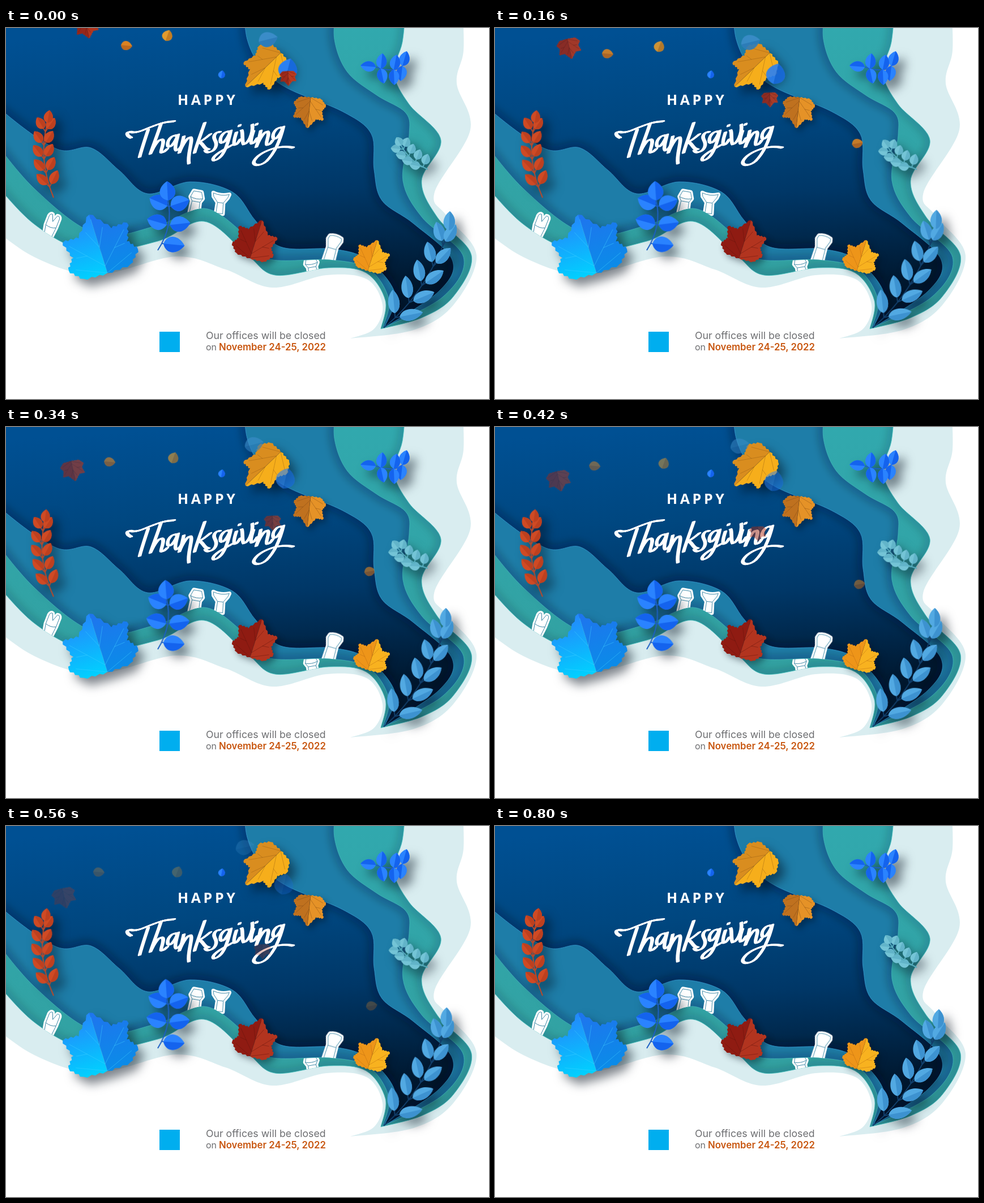
Recreate the animation shown at these times as an HTML page. Size 853 px wide and 656 px high, loop 830 ms.

```html
<!DOCTYPE html>
<html lang="en">
<head>
<meta charset="utf-8">
<title>Happy Thanksgiving</title>
<style>
html, body { margin: 0; width: 100%; height: 100%; overflow: hidden; background: #fff; }
svg { display: block; width: 853px; height: 656px; }
.fall { animation: drift 830ms linear infinite, fade 830ms linear infinite; }
.sway { animation: sway 830ms infinite; }
.lift { filter: drop-shadow(11px 12px 9px rgba(0, 12, 25, .5)); }
.soft { filter: drop-shadow(5px 6px 6px rgba(0, 12, 25, .4)); }
@keyframes drift {
  96.4%, 100% { transform: translate(var(--dx), var(--dy)); }
}
@keyframes fade {
  0%, 12% { opacity: 1; }
  92%, 100% { opacity: 0; }
}
@keyframes sway {
  0% { transform: rotate(0deg); animation-timing-function: cubic-bezier(.61, 1, .88, 1); }
  48.2% { transform: rotate(var(--a)); animation-timing-function: cubic-bezier(.12, 0, .39, 0); }
  96.4%, 100% { transform: rotate(0deg); }
}
.happy { font: 700 25px "Open Sans", "Noto Sans", sans-serif; letter-spacing: 4.6px; fill: #fff; }
.note { font: 400 17.7px Inter, sans-serif; fill: #6d6e71; }
.date { font: 600 16.75px Inter, sans-serif; fill: #c8560f; }
</style>
</head>
<body>
<svg id="stage" viewBox="0 0 853 656" xmlns="http://www.w3.org/2000/svg"></svg>
<script>
// Smooth curve through "x y, x y" key points
function curve(text) {
  const p = text.split(', ').map(s => s.split(' ').map(Number));
  return p.slice(1).reduce((d, c, i) => {
    const b = p[i], a = p[i - 1] || b, e = p[i + 2] || c;
    const near = b.map((v, k) => v + (c[k] - a[k]) / 6);
    const far = c.map((v, k) => v - (e[k] - b[k]) / 6);
    return `${d}C${near} ${far} ${c}`;
  }, p[0].join(' '));
}

// Paper layers, widest first: right edge down to the tip, lower edge back to the left
const layers = [
  { id: 'pale', fill: '#d9edf0',
    right: '806 -40, 808 40, 796 98, 820 180, 757 290, 778 332, 831 402, 790 490, 720 534, 608 549',
    low: '608 549, 650 532, 665 490, 637 444, 566 437, 470 459, 388 427, 300 404, 160 436, 50 405, -40 340' },
  { id: 'teal', fill: 'url(#tealFill)', shade: .14, edge: '#45c3bf',
    right: '706 -40, 700 25, 685 80, 712 135, 768 198, 734 270, 762 335, 822 402, 790 475, 735 512, 662 532',
    low: '662 532, 670 482, 636 433, 570 424, 475 437, 425 400, 350 342, 268 377, 150 395, 50 347, -40 250' },
  { id: 'blue', fill: '#1e7da8', shade: .22, edge: '#43b9bd',
    right: '584 -40, 580 20, 603 78, 655 119, 706 150, 712 190, 701 270, 735 335, 808 405, 772 475, 665 531',
    low: '665 531, 676 480, 642 427, 575 410, 462 408, 418 362, 350 319, 265 350, 160 364, 50 284, -40 175' },
  { id: 'navy', fill: 'url(#navyFill)', shade: .26, edge: '#3a9fd6',
    right: '420 -40, 426 20, 450 68, 496 106, 595 148, 645 187, 650 250, 664 305, 720 346, 788 410, 765 465, 668 530',
    low: '668 530, 687 470, 640 411, 580 391, 485 387, 440 340, 400 290, 325 272, 250 293, 200 252, 150 212, 90 214, 0 152, -40 105' }
];

const clip = (id, art) => `<g clip-path="url(#${id})">${art}</g>`;

function layer({ id, fill, right, low, shade, edge }) {
  const d = `M-40 -40L${curve(right)}L${curve(low)}Z`;
  const rim = shade ? clip(id, `<path d="${d}" fill="none" stroke="#001526" stroke-opacity="${shade}" stroke-width="18" filter="url(#blur)"/>`) +
    `<path d="${d}" fill="none" stroke="${edge}" stroke-opacity=".75"/>` : '';
  return `<clipPath id="${id}"><path d="${d}"/></clipPath><path d="${d}" fill="${fill}"/>${rim}`;
}

// Simple leaf growing from its base, angle clockwise from up; lift slides it along its axis
const leaf = (x, y, angle, len, w, [c1, c2], lift = 0) =>
  `<g transform="translate(${x} ${y}) rotate(${angle}) scale(${w} ${len}) translate(0 ${lift})">
    <path d="M0 0C.7 -.15 .65 -.7 0 -1C-.65 -.7 -.7 -.15 0 0" fill="${c1}"/>
    <path d="M0 0C.7 -.15 .65 -.7 0 -1Z" fill="${c2}"/></g>`;
const petal = (x, y, angle, len, w, tones) => leaf(x, y, angle, len, w, tones, .5);

// Half a maple leaf: key corners joined by toothed edges
const corners = [[0, 0], [38, -2], [57, -22], [44, -40], [53, -69], [27, -68], [0, -100]];
const half = corners.slice(1).reduce((d, [x, y], i) => {
  const [px, py] = corners[i], dx = x - px, dy = y - py, size = 2.6 / Math.hypot(dx, dy);
  for (let j = 1; j <= 3; j++) {
    const f = (j - .4) / 3;
    d += `L${px + dx * f - dy * size} ${py + dy * f + dx * size}L${px + dx * j / 3} ${py + dy * j / 3}`;
  }
  return d;
}, 'M0 0') + 'Z';
const veins = 'M0 0V-92' + [-1, 1].map(s =>
  `M0 0L${46 * s} -20M0 -12L${45 * s} -60M0 -44L${14 * s} -74M${22 * s} -36L${40 * s} -38`).join('');

// Maple leaf from its stalk (x, y) to its main tip (tx, ty)
function maple(x, y, tx, ty, wide, left, right, vein) {
  const k = Math.hypot(tx - x, ty - y) / 100;
  const angle = Math.atan2(tx - x, y - ty) * 180 / Math.PI;
  return `<g transform="translate(${x} ${y}) rotate(${angle}) scale(${k * wide} ${k})">
    <path d="${half}" fill="${left}" transform="scale(-1 1)"/><path d="${half}" fill="${right}"/>
    <path d="${veins}" fill="none" stroke="${vein}" stroke-width="${.7 / k}" stroke-opacity=".6"/></g>`;
}

// Leaves in even pairs along a quadratic stem; sizes and angles run from base to end
function branch({ stem, pairs, len, w, left, right, end, gap, tones, line, bare = 0 }) {
  const [x0, y0, x1, y1, x2, y2] = stem;
  const at = (a, b, c, t) => (1 - t) ** 2 * a + 2 * t * (1 - t) * b + t * t * c;
  const mix = ([a, b], t) => a + (b - a) * t;
  const stroke = `fill="none" stroke="${line}" stroke-width="2"`;
  let art = `<path d="M${x0} ${y0}Q${x1} ${y1} ${x2} ${y2}" ${stroke}/>`;
  for (let i = 0; i < pairs; i++) {
    const t = .14 + .74 * i / (pairs - 1), size = mix(len, t);
    const x = at(x0, x1, x2, t), y = at(y0, y1, y2, t);
    for (const angle of i < bare ? [mix(right, t)] : [mix(left, t), mix(right, t)])
      art += `<path d="M0 0V${-gap}" transform="translate(${x} ${y}) rotate(${angle})" ${stroke}/>` +
        leaf(x, y, angle, size, w, tones, -gap / size);
  }
  return art + leaf(x2, y2, end, len[1], w, tones);
}

const sway = (x, y, a, art) =>
  `<g class="lift"><g class="sway" style="--a:${a}deg;transform-origin:${x}px ${y}px">${art}</g></g>`;
const fall = (dx, dy, art) => `<g class="fall" style="--dx:${dx}px;--dy:${dy}px">${art}</g>`;

// Dental parts
const parts = {
  fork: 'M-9 -13Q-8 -18 -4 -17L0 -5L5 -17Q9 -18 10 -13L9 4L6 24H-7L-10 4ZM-10 4Q0 8 9 4',
  cap: 'M-7 -15H7L11 -4L7 3L8 22H-8L-7 3L-11 -4ZM-11 -4Q0 0 11 -4M-7 3H7',
  cup: 'M-14 -13Q0 -8 14 -13L12 -7L5 3L6 22H-6L-5 3L-13 -7ZM-5 3H5',
  post: 'M-10 -18Q0 -22 11 -18L12 -13L7 0L8 26H-9L-8 2L-12 -12ZM-8 3H7'
};
const part = (name, x, y, r) => `<g transform="translate(${x} ${y}) rotate(${r})" stroke-linejoin="round">
  <path d="${parts[name]}" fill="#fff" stroke="#fff" stroke-width="7.5"/>
  <path d="${parts[name]}" fill="#fff" stroke="#3a87a5" stroke-width=".9"/></g>`;

// Brush lettering: [advance, strokes] per letter on a rising baseline; capitals are swash forms
const arch = 'M6 -26C4 -15 1 -5 -2 3C4 -12 13 -26 18 -24';
const bowl = 'M19 -28C10 -34 -1 -19 2 -11C6 -5 15 -18 20 -31';
const glyphs = {
  t: [20, 'M-15 -29C-25 -34 -24 -41 -14 -39C2 -35 26 -57 61 -58M15 -43C10 -28 4 -10 0 5'],
  h: [28, 'M18 -53C12 -34 4 -14 -1 1C6 -15 14 -26 20 -24C25 -21 17 -6 18 -2C21 0 25 -4 29 -8'],
  a: [24, bowl + 'C16 -15 13 -5 17 -3C21 -3 25 -9 28 -14'],
  n: [26, arch + 'C23 -20 13 -4 17 -1C20 0 24 -4 27 -9'],
  N: [27, arch + 'C23 -20 12 5 15 22'],
  k: [21, 'M16 -48C10 -30 2 -10 -2 5M26 -28C19 -22 11 -16 6 -14C14 -12 14 -1 23 -1'],
  s: [21, 'M22 -30C14 -31 9 -23 13 -16C18 -8 14 2 5 5C0 7 -4 4 -4 2'],
  g: [26, bowl + 'C16 -12 11 4 3 14C-4 22 -13 24 -11 18C-8 10 11 1 25 -7'],
  G: [0, bowl + 'C15 -10 6 14 -10 30C-22 40 -35 38 -32 30C-25 16 7 0 37 6'],
  i: [11, 'M4 -26C1 -17 -2 -6 1 -4C4 -3 8 -9 11 -14M9 -37L10 -39'],
  v: [19, 'M2 -29C5 -27 2 -6 6 -4C14 -6 23 -23 21 -39']
};
let pen = 236;
const word = [...'thaNksgiviNG'.replace('viN', 'vin')].map(c => {
  const [advance, d] = glyphs[c], x = pen;
  pen += advance;
  return `<path d="${d}" transform="translate(${x} ${222 - (x - 250) * .075})"/>`;
}).join('');
// A thin stroke repeated sideways acts as a flat nib
const nib = [-2, -1, 0, 1, 2].map(i => `<g transform="translate(${i * 1.05} ${-i * .35})">${word}</g>`).join('');

const [pale, teal, blue, navy] = layers.map(layer);
const amber = ['#d98222', '#bd691d'], royal = ['#2a83ff', '#1463ee'];

const redBranch = branch({ stem: [84, 300, 56, 232, 73, 168], pairs: 5, len: [27, 23], w: 16, gap: 6,
  left: [-48, -28], right: [24, 36], end: 10, tones: ['#cf4a24', '#bd401f'], line: '#b8482a' });
const royalBranch = branch({ stem: [268, 393, 296, 350, 286, 305], pairs: 3, len: [38, 34], w: 27, gap: 3,
  left: [-84, -64], right: [100, 68], end: -3, tones: royal, line: '#1c5fc4', bare: 1 });
const tealBranch = branch({ stem: [745, 250, 713, 236, 698, 208], pairs: 4, len: [20, 17], w: 15, gap: 5,
  left: [-78, -85], right: [20, 22], end: -30, tones: ['#74c4d6', '#62b4c9'], line: '#58aebf' });
const skyBranch = branch({ stem: [667, 530, 742, 470, 782, 358], pairs: 5, len: [43, 34], w: 20, gap: 8,
  left: [-3, -18], right: [88, 24], end: 3, tones: ['#52a9e2', '#3d92d0'], line: '#123f6b' });
const sprig = branch({ stem: [704, 62, 692, 82, 653, 69], pairs: 3, len: [27, 27], w: 18, gap: 0,
  left: [190, 165], right: [18, 4], end: -85, tones: royal, line: '#1c5fc4' });

document.getElementById('stage').innerHTML = `
<defs>
  <filter id="blur" x="-10%" y="-10%" width="120%" height="120%"><feGaussianBlur stdDeviation="7"/></filter>
  <linearGradient id="navyFill" gradientUnits="userSpaceOnUse" x1="340" y1="0" x2="370" y2="460">
    <stop offset="0" stop-color="#005093"/><stop offset=".35" stop-color="#004780"/>
    <stop offset=".65" stop-color="#003767"/><stop offset="1" stop-color="#001a33"/>
  </linearGradient>
  <linearGradient id="tealFill" x1="0" y1="0" x2="0" y2="1">
    <stop offset="0" stop-color="#31a9af"/><stop offset="1" stop-color="#329f9e"/>
  </linearGradient>
  <linearGradient id="cyan" x1="0" y1="1" x2="0" y2="0">
    <stop offset="0" stop-color="#00d2ff"/><stop offset="1" stop-color="#2488fb"/>
  </linearGradient>
  <linearGradient id="azure" x1="0" y1="1" x2="0" y2="0">
    <stop offset="0" stop-color="#0a8ce8"/><stop offset="1" stop-color="#1f74ee"/>
  </linearGradient>
</defs>
${pale}${teal}
${clip('teal', part('fork', 81, 347, 18) + part('cap', 540, 420, -10))}
${blue}
${clip('blue', part('cap', 336, 304, 10) + part('cup', 379, 306, 6))}
${navy}
${clip('navy', fall(11, 228, petal(638, 158, 80, 20, 16, amber)))}
${clip('blue', part('post', 577, 387, 16))}
<text class="happy" x="303" y="136">HAPPY</text>
<g role="img" aria-label="Thanksgiving" fill="none" stroke="#fff" stroke-width="2.5" stroke-linecap="round" stroke-linejoin="round">${nib}</g>
${sway(84, 300, -2.2, redBranch)}
<g class="lift">${maple(179, 433, 147, 330, 1.04, 'url(#cyan)', 'url(#azure)', '#43d0ff')}</g>
${sway(268, 393, -1.5, royalBranch)}
<g class="soft">${maple(431, 407, 452, 340, .95, '#8f1b12', '#b2341f', '#5e130c')}</g>
<g class="soft">${maple(639, 429, 656, 375, .95, '#ee9519', '#f8b21f', '#b86a10')}</g>
<g class="lift">${maple(485, 44, 423, 104, .72, '#f6ae1b', '#d98d1f', '#8a5410')}</g>
<g class="soft">${maple(538, 123, 532, 177, .92, '#e59227', '#bf711f', '#7c4612')}</g>
<g class="lift">${sprig}</g>
${sway(745, 250, -8, tealBranch)}
${sway(667, 530, -2, skyBranch)}
${petal(381, 82, 10, 14, 12, royal)}
${fall(-57, 182, maple(139, -17, 147, 18, 1.02, '#b2351d', '#96271a', '#5e130c'))}
${fall(-70, 72, petal(213, 31, 95, 20, 16, amber))}
${fall(25, 97, petal(285, 13, 20, 20, 18, ['#e39a2c', '#c67d20']))}
${fall(-58, 25, petal(463, 20, 76, 34, 26, ['#3a8cc8', '#2d7cba']))}
${fall(-10, 44, petal(498, 72, 14, 37, 33, ['#2a80f2', '#1769dc']))}
${fall(-65, 190, maple(498, 76, 499, 102, 1, '#b93a1e', '#9c2a1a', '#5e130c'))}
<rect x="271" y="537" width="36" height="36" fill="#00aeef"/>
<text class="note" x="353" y="550">Our offices will be closed</text>
<text class="note" x="353" y="570" style="font-size:16px">on</text>
<text class="date" x="376" y="570">November 24-25, 2022</text>`;
</script>
</body>
</html>
```
